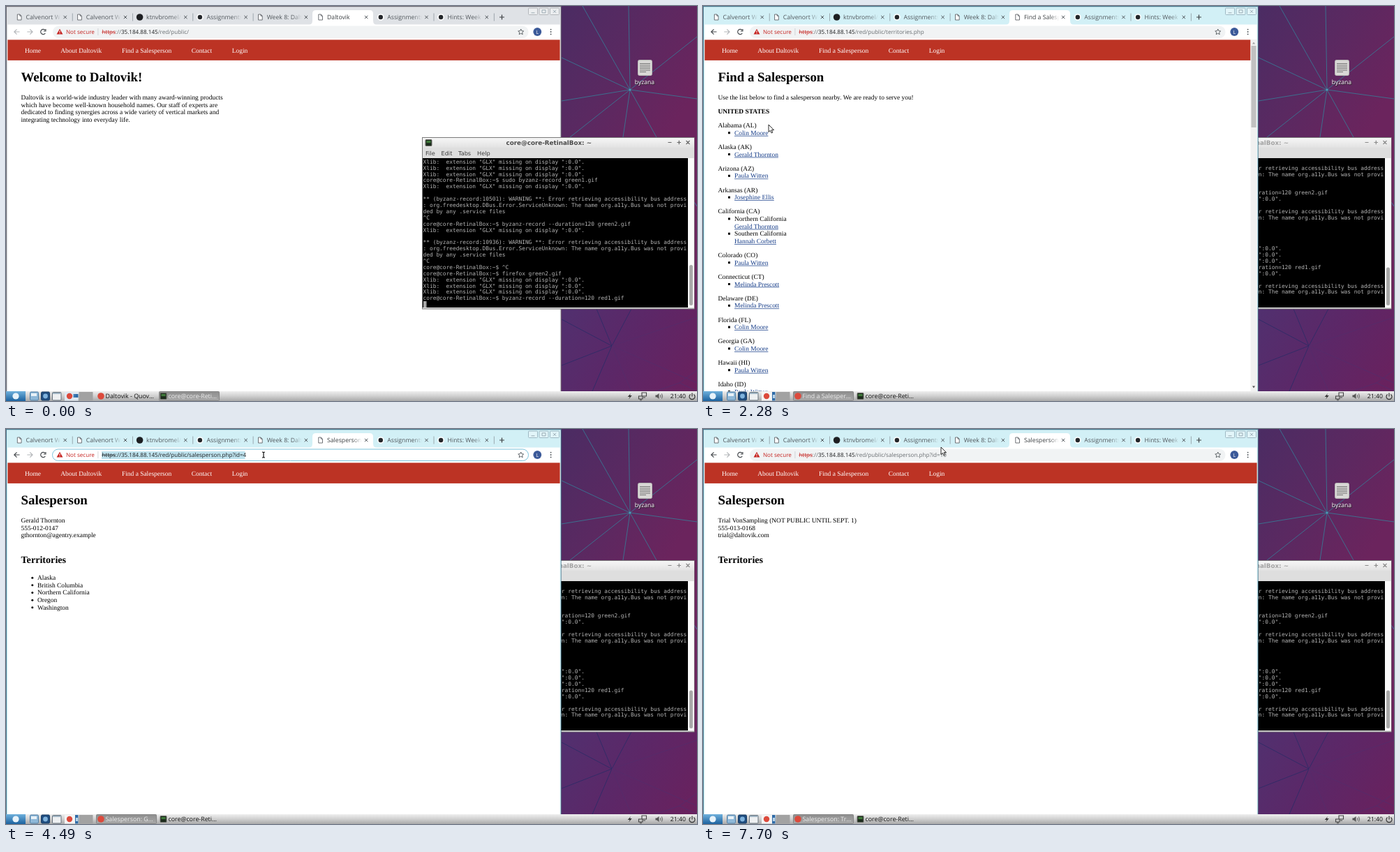
An HTML page with a canvas that plays this animation: 990x566 px, repeating every 8000 ms.

```html
<!DOCTYPE html>
<html lang="en">
<head>
<meta charset="utf-8">
<title>Desktop session</title>
<style>
  html, body { margin: 0; width: 100%; height: 100%; overflow: hidden; background: #4f2d63; }
  canvas { display: block; }
</style>
</head>
<body>
<canvas id="stage" width="990" height="566"></canvas>
<script>
const ctx = document.getElementById('stage').getContext('2d');
ctx.textRendering = 'geometricPrecision';

const LOOP = 8000, RAISE = 450;
const sans = (px, w = 400) => `${w} ${px}px "Open Sans", sans-serif`;
const serif = (px = 9.43, w = 400) => `${w} ${px}px "Liberation Serif", serif`;
const dejavu = (px, w = 400) => `${w} ${px}px "DejaVu Sans", sans-serif`;
const mono = '7.857px "DejaVu Sans Mono", monospace';

// ---- drawing helpers ----
function rect(x, y, w, h, color) { ctx.fillStyle = color; ctx.fillRect(x, y, w, h); }
function round(x, y, w, h, r, fill, stroke) {
  ctx.beginPath(); ctx.roundRect(x, y, w, h, r);
  if (fill) { ctx.fillStyle = fill; ctx.fill(); }
  if (stroke) { ctx.strokeStyle = stroke; ctx.lineWidth = 1; ctx.stroke(); }
}
function disc(x, y, r, color) {
  ctx.beginPath(); ctx.arc(x, y, r, 0, 7); ctx.fillStyle = color; ctx.fill();
}
function draw(d, x, y, stroke, width = 1, fill) {
  const p = new Path2D(d);
  ctx.save(); ctx.translate(x, y);
  if (fill) { ctx.fillStyle = fill; ctx.fill(p); }
  if (stroke) { ctx.strokeStyle = stroke; ctx.lineWidth = width; ctx.stroke(p); }
  ctx.restore();
}
function text(s, x, y, color, font, align = 'left') {
  ctx.font = font; ctx.fillStyle = color; ctx.textAlign = align;
  ctx.fillText(s, x, y);
  return x + ctx.measureText(s).width;
}
function shade(x0, y0, x1, y1, ...colors) {
  const g = ctx.createLinearGradient(x0, y0, x1, y1);
  colors.forEach((c, i) => g.addColorStop(i / (colors.length - 1), c));
  return g;
}
const clamp = v => Math.max(0, Math.min(1, v));

// ---- desktop ----
function rays(x, y, ends, color) {
  ctx.strokeStyle = color; ctx.lineWidth = 0.8;
  ctx.beginPath();
  for (const [a, b] of ends) { ctx.moveTo(x, y); ctx.lineTo(a, b); }
  ctx.stroke();
}
function desktop() {
  rect(0, 0, 990, 566, shade(796, 0, 990, 120, '#4b2c63', '#5a2961', '#6b245d'));
  rect(796, 434, 194, 120, shade(796, 434, 990, 552, '#51306f', '#5c2767', '#6a215d'));
  rays(894, 120, [[892, 0], [990, 44], [990, 133], [932, 188], [884, 188],
    [808, 188], [796, 136], [796, 74], [826, 0]], '#35809a');
  rays(868, 487, [[846, 434], [896, 434], [796, 449], [796, 515], [840, 552]], '#2a2b66');
  rays(868, 487, [[990, 446], [990, 540], [896, 552]], '#552c6b');
  rays(965, 540, [[990, 522], [990, 552], [930, 552]], '#552c6b');
  rays(990, 287, [[986, 281]], '#3a86b4');
  disc(894, 120, 1.5, '#4a9fb8');
  round(905.5, 77.5, 20, 22, 2, '#d9d8d6', '#b4b4b2');
  for (let i = 0; i < 6; i++) rect(908, 82 + i * 2.4, i == 5 ? 9 : 15, 1, '#777');
  text('byzana', 916, 113, '#222', sans(8.6), 'center');
  text('byzana', 915, 112, '#fff', sans(8.6), 'center');
}

// ---- terminal ----
const HOST = 'core@core-RetinalBox';
const prompt = cmd => `${HOST}:~$ ${cmd}`;
const xlib = 'Xlib:  extension "GLX" missing on display ":0.0".';
const warn = pid => ['',
  `** (byzanz-record:${pid}): WARNING **: Error retrieving accessibility bus address`,
  ': org.freedesktop.DBus.Error.ServiceUnknown: The name org.a11y.Bus was not provi',
  'ded by any .service files'];
const log = [xlib, xlib, xlib, prompt('sudo byzanz-record green1.gif'), xlib,
  ...warn(10501), '^C', prompt('byzanz-record --duration=120 green2.gif'), xlib,
  ...warn(10936), '^C', prompt('^C'), prompt('firefox green2.gif'), xlib, xlib, xlib,
  prompt('byzanz-record --duration=120 red1.gif'), xlib, ...warn(11275)];

function terminalIcon(x, y, s) {
  round(x, y, s, s, 1, '#1c2b1c', '#6d6d68');
  rect(x + 1.5, y + 1.5, s - 3, s * 0.35, '#3f7a3a');
}
function terminal(t, active) {
  rect(596, 188, 390.5, 246.5, '#7a7a7a');
  rect(597, 189, 389, 244.5, '#dedede');
  rect(597, 189, 389, 14, shade(0, 189, 0, 203, '#f6f6f6', '#e2e2e2'));
  terminalIcon(601, 191.5, 9);
  const ink = active ? '#4a4a4a' : '#a3a3a3';
  text(HOST + ': ~', 839, 199, ink, dejavu(8.76, 700), 'right');
  draw('M-2.5 0H2.5M10.5 0H16M13.3-2.7V2.7M23.5-2.5L28.5 2.5M28.5-2.5L23.5 2.5', 951, 195.5,
    active ? '#666' : '#8a8a8a', 1.2);
  [['File', 601], ['Edit', 623.5], ['Tabs', 648], ['Help', 675]]
    .forEach(([s, x]) => text(s, x, 213.5, '#3c3c3c', dejavu(8.2)));
  rect(597, 218, 380, 214, '#000');
  rect(977, 218, 8.5, 214, '#fafafa');
  const extra = t < 100 ? 0 : t < 260 ? 1 : 5;
  round(979, 371 + extra * 0.7, 5, 58 - extra * 0.7, 2.5, '#a9a9a9');
  for (let r = 0; r < 23; r++) text(log[r + extra], 597.5, 225.8 + r * 8.89, '#b4b4b4', mono);
  rect(598, 423, 4.5, 9, '#aaa');
}

// ---- web pages ----
const MAIL = 'gthornton@agentry.example', REP = 'Gerald Thornton';
const pages = [
  { title: 'Daltovik', task: 'Daltovik - Quov…', path: '/red/public/' },
  { title: 'Find a Salesperson', task: 'Find a Salesper…', path: '/red/public/territories.php' },
  { title: 'Salesperson: ' + REP, task: 'Salesperson: G…', path: '/red/public/salesperson.php?id=4' },
  { title: 'Salesperson: Trial', task: 'Salesperson: Tr…', path: '/red/public/salesperson.php?id=10' },
];
const territories = `Alabama (AL)|Colin Moore
Alaska (AK)|${REP}
Arizona (AZ)|Paula Witten
Arkansas (AR)|Josephine Ellis
California (CA)|Northern California/${REP}|Southern California/Hannah Corbett
Colorado (CO)|Paula Witten
Connecticut (CT)|Melinda Prescott
Delaware (DE)|Melinda Prescott
Florida (FL)|Colin Moore
Georgia (GA)|Colin Moore
Hawaii (HI)|Paula Witten
Idaho (ID)|Paula Witten`.split('\n').map(s => s.split('|'));
const LINE = 10.65;

function lines(list, y, x = 21.5) {
  list.forEach((s, i) => text(s, x, y + i * LINE, '#000', serif()));
}
function link(s, y) {
  const end = text(s, 45, y, '#153c88', serif());
  rect(45, y + 1, end - 45, 0.7, '#153c88');
}
function territoryList() {
  lines(['Use the list below to find a salesperson nearby. We are ready to serve you!'], 134);
  text('UNITED STATES', 21.5, 154, '#000', serif(9.43, 700));
  let y = 174.2;
  for (const [state, ...items] of territories) {
    lines([state], y);
    for (const item of items) {
      const parts = item.split('/');
      rect(36, y + LINE - 4.6, 3, 3, '#000');
      if (parts[1]) lines([parts[0]], y += LINE, 45);
      link(parts.at(-1), y += LINE);
    }
    y += 20.15;
  }
}
function webPage(n) {
  const right = n == 1 ? 784.5 : 793.6;
  rect(2.4, 48, 791.2, 518, '#fff');
  rect(2.4, 48.4, right - 2.4, 29.5, '#bc3324');
  [['Home', 27], ['About Daltovik', 78.3], ['Find a Salesperson', 166], ['Contact', 265.8], ['Login', 323.7]]
    .forEach(([s, x]) => text(s, x, 66.9, '#fff', serif()));
  const head = ['Welcome to Daltovik!', 'Find a Salesperson', 'Salesperson', 'Salesperson'][n];
  text(head, 21.5, 107.7, '#000', serif(18.85, 700));
  if (n == 0) {
    lines(['Daltovik is a world-wide industry leader with many award-winning products',
      'which have become well-known household names. Our staff of experts are',
      'dedicated to finding synergies across a wide variety of vertical markets and',
      'integrating technology into everyday life.'], 134);
  } else if (n == 1) {
    territoryList();
    rect(784.5, 48, 9.1, 504, '#f1f1f1');
    rect(785.5, 57, 7, 117, '#c1c1c1');
    draw('M-2 1.5L0-1.5L2 1.5Z', 789, 53, null, 0, '#a3a3a3');
    draw('M-2-1.5L0 1.5L2-1.5Z', 789, 546, null, 0, '#505050');
  } else {
    lines(n == 2 ? [REP, '555-012-0147', MAIL]
      : ['Trial VonSampling (NOT PUBLIC UNTIL SEPT. 1)', '555-013-0168', 'trial@daltovik.com'], 134);
    text('Territories', 21.5, 192.4, '#000', serif(14.13, 700));
    if (n == 2) {
      const list = ['Alaska', 'British Columbia', 'Northern California', 'Oregon', 'Washington'];
      lines(list, 216.1, 45);
      list.forEach((_, i) => disc(37.8, 213.2 + i * LINE, 1.5, '#000'));
    }
  }
}

// ---- browser ----
const IP = '35.184.88.145', UI = sans(8.1), GREY = '#686d71', DARK = '#1c1e20', RED = '#c5221f';

function docIcon(x, y) {
  draw('M-2.7-4H.8L3-1.8V4H-2.7ZM.8-4V-1.8H3', x, y, '#5f6368', 0.9, '#fff');
}
function spinner(x, y, t) {
  ctx.beginPath(); ctx.arc(x, y, 3.8, t / 120, t / 120 + 1.2);
  ctx.strokeStyle = '#8a8f94'; ctx.lineWidth = 1.1; ctx.stroke();
}
function address(path, x, proto, tone, struck) {
  const a = text('https', x, 40, proto, UI);
  if (struck) rect(x, 37.2, a - x, 0.6, proto);
  const b = text('://', a, 40, tone, UI);
  return text(path, text(IP, b, 40, DARK, UI), 40, tone, UI);
}
function tabs(s, t) {
  const names = ['Calvenort Word', 'Calvenort Word', 'ktnvbromel/week', 'Assignments', 'Week 8: Daltovik', s.title,
    'Assignments', 'Hints: Week 8'];
  draw('M433 27Q439 27 439 21V11Q439 6 444 6H521Q526 6 526 11V21Q526 27 532 27Z', 0, 0, null, 0, '#fff');
  names.forEach((name, i) => {
    const x = 19 + 86.3 * i, on = i == 5;
    if (on && s.loading) spinner(x, 16, t);
    else if (i == 2) disc(x, 16, 4.8, '#1d1f22');
    else if (i == 3 || i > 5) { disc(x, 16, 4.8, '#fff'); disc(x, 16, 3.2, '#23262a'); }
    else docIcon(x, 16);
    const tx = x + 9.5, ink = on ? '#3c4043' : '#50565b';
    ctx.save();
    ctx.beginPath(); ctx.rect(tx, 6, 50, 20); ctx.clip();
    text(name, tx, 19, shade(tx + 37, 0, tx + 50, 0, ink, ink + '00'), sans(8.7));
    ctx.restore();
    draw('M-2.2-2.2L2.2 2.2M2.2-2.2L-2.2 2.2', x + 65.7, 16, '#50565b', 1);
    if (i != 4 && !on) rect(x + 75.8, 10.5, 0.8, 11, '#8e989f');
  });
  draw('M-3.5 0H3.5M0-3.5V3.5', 710.5, 16, '#3c4043', 1.2);
}
function toolbar(s, t) {
  const arrow = 'M4 0H-3.6M0-3.7L-3.7 0L0 3.7';
  draw(arrow, 15.5, 37, s.page ? '#45494d' : '#b4b7ba', 1.2);
  draw('M-4 0H3.6M0-3.7L3.7 0L0 3.7', 34.3, 37, '#b4b7ba', 1.2);
  if (s.loading) draw('M-3-3L3 3M3-3L-3 3', 53.3, 37, '#45494d', 1.2);
  else draw('M3 2A3.6 3.6 0 1 1 2.6-2.5M3.6-4V-1H.6', 53.3, 37, '#45494d', 1.2);

  round(67, 28.5, 681.5, 17.5, 8.7, '#f1f3f4');
  if (s.focus) {
    ctx.globalAlpha = clamp((t - 4320) / 150);
    round(66.5, 29, 682, 16.5, 8.2, '#fff', '#7cc4dd');
    ctx.globalAlpha = 1;
  }
  draw('M0-4L4.4 3.7H-4.4Z', 77, 36.8, null, 0, RED);
  rect(76.5, 35.2, 1, 2.8, '#fff'); rect(76.5, 38.7, 1, 1, '#fff');
  text('Not secure', 86, 40, RED, UI);
  rect(131.5, 32, 0.8, 10, '#c9ccd0');
  if (s.focus && t < 5010) rect(137, 32, 205.5, 11, '#bfe3ee');
  const end = s.focus ? address(s.path, 137.3, DARK, DARK, true) : address(s.path, 137.3, RED, GREY, true);
  if (s.focus && t >= 5010) rect(end, 32, 0.8, 10.5, '#000');
  draw('M0-4L1.2-1.3L4-1L1.9.9L2.5 3.7L0 2.3L-2.5 3.7L-1.9.9L-4-1L-1.2-1.3Z', 737.7, 37, '#50565b', 0.9);
  disc(761.3, 37, 5.9, '#3c5a99');
  text('L', 761.3, 39.6, '#fff', sans(7), 'center');
  [33.6, 37, 40.4].forEach(y => disc(780.6, y, 0.95, '#50565b'));
}
function globe(y) {
  disc(77, y, 4, '#5f6368');
  draw('M-3-1L-1-2.5L0-.5L-2 1ZM1 0L3-1V1.5L1 2.5Z', 77, y, null, 0, '#fff');
}
function popup(t) {
  const typed = 'id=' + (t < 5590 ? '' : t < 5780 ? '1' : '10');
  const path = '/red/public/salesperson.php?' + typed, full = 'https://' + IP + path;
  const three = t < 5590;
  ctx.save();
  ctx.shadowColor = 'rgba(0,0,0,.35)'; ctx.shadowBlur = 8; ctx.shadowOffsetY = 2;
  round(63, 26, 689, three ? 86 : 65, 4, '#fff');
  ctx.restore();
  rect(63, 48, 689, 21.3, '#f1f1f1');
  globe(37); globe(58.5);
  const end = address(path, 93, GREY, GREY, false);
  if (t < 6250 || t >= 6760) rect(end, 32, 0.8, 10.5, '#000');
  text(full, 93, 61.5, '#0f559f', sans(8.1, 600));
  let y = 83;
  if (three) {
    globe(80);
    text(full + '4', 93, y, '#0f559f', UI);
    y += 21.3;
  }
  draw('M1.5 1.5L3.8 3.8M2.2-.5A2.5 2.5 0 1 1-2.8-.5A2.5 2.5 0 1 1 2.2-.5', 77, y - 3, '#5f6368', 1);
  text(' - Quovel Search', text(full, 93, y, '#000', UI), y, '#55595d', UI);
}
function statusBubble(t) {
  let alpha = 0, id = 4;
  if (t > 1150 && t < 1450) alpha = clamp((t - 1150) / 120);
  if (t > 2360 && t < 3370) { alpha = Math.min(clamp((t - 2360) / 120), clamp((3370 - t) / 160)); id = t < 2440 ? 1 : 4; }
  if (!alpha) return;
  ctx.globalAlpha = alpha;
  round(2, 546, 264, 20, [0, 3, 0, 0], '#f6f7f8', '#e4e6e8');
  const path = t < 2000 ? 'territories.php' : 'salesperson.php?id=' + id;
  text(`https://${IP}/red/public/${path}`, 5, 555.5, '#5f6368', sans(8.7));
  ctx.globalAlpha = 1;
}
function browser(s, t, active) {
  rect(0, 0, 795.6, 566, active ? '#47758c' : '#6b6b73');
  rect(1, 1.2, 793.8, 565, active ? '#d2f0f6' : '#dfe2e6');
  tabs(s, t);
  [750, 765.5, 781].forEach((x, i) => {
    round(x - 1.5, 3, 13, 9.5, 1, active ? '#e2f5f9' : '#eceef0', active ? '#9fb9c4' : '#b5b8bc');
    draw(['M-2.5 2H2.5', 'M-2.5-2H2.5V2H-2.5Z', 'M-2-2L2 2M2-2L-2 2'][i], x + 5, 7.8, '#93a4ae', 0.9);
  });
  rect(2.4, 26.5, 791.2, 21.5, '#fff');
  toolbar(s, t);
  webPage(s.page);
  statusBubble(t);
  if (s.focus && t >= 5360) popup(t);
}

// ---- task bar ----
function taskButton(x, label, on) {
  if (on) round(x + 0.5, 552.5, 86, 13, 1, shade(0, 552, 0, 566, '#8d8d8d', '#aaaaaa'), '#858585');
  text(label, x + 13.5, 562.3, on ? '#ececec' : '#111', sans(8.85));
}
function taskBar(s, active) {
  rect(0, 552, 990, 14, shade(0, 552, 0, 566, '#efefef', '#cfcfcf', '#a9a9a9'));
  rect(0, 552, 28, 14, shade(0, 552, 0, 566, '#6fb0dc', '#1c629f'));
  disc(14, 559, 4.6, '#e8f3fa');
  round(34.5, 553, 12, 12, 1.5, '#8fb8d8', '#4f7da3');
  rect(36, 555, 8, 4, '#e8f1f7');
  round(50.5, 553, 12, 12, 1.5, '#1f4d80', '#173a60');
  disc(56.5, 559, 3.4, '#7fb2dc');
  round(66.5, 553.5, 12.5, 11.5, 1, '#eef0f2', '#66727c');
  rect(67, 554, 11.5, 2, '#9fb3c2');
  rect(84, 553, 19.5, 12.5, active ? '#f4f4f4' : '#dfe9f2');
  rect(104.5, 553, 20, 12.5, '#a2a2a2');
  rect(99, active ? 553 : 556, 4.5, active ? 12.5 : 5, '#2f6ca8');
  if (active) rect(100, 557, 3, 5, '#b9d3e8');
  else rect(96.5, 556, 3, 5, '#3f7cb6');
  disc(91, 559, 4.2, '#dc4a3c');
  taskButton(129, pages[s.page].task, active);
  taskButton(219, HOST.slice(0, 14) + '…', !active);
  disc(136, 559, 4.8, '#dc4a3c');
  terminalIcon(221, 554.5, 9);
  draw('M1.5-4L-3 1H0L-1.5 4.5L3-1H0Z', 893.7, 559, null, 0, '#333');
  draw('M-1-5H5.5V0H-1ZM-5.5 0H0V4H-5.5ZM-4 5.5H-1M1 2H4', 912, 559, '#444', 1.1);
  draw('M-5-1.5H-3L0-4V4L-3 1.5H-5Z', 935.5, 559, null, 0, '#555');
  draw('M2-2Q3.2 0 2 2M4-3.5Q6 0 4 3.5', 935.5, 559, '#555', 0.9);
  text('21:40', 951.8, 562.3, '#111', sans(8.7));
  draw('M2.4-3A4 4 0 1 1-2.4-3M0-5V0', 983, 559.5, '#333', 1.2);
}

// ---- pointer ----
const route = [[50, 640, 300], [900, 226, 64], [1050, 224, 60], [1350, 224, 60], [1680, 185, 76],
  [2280, 94, 170], [2500, 94, 214], [3550, 94, 214], [4250, 369, 37], [7620, 369, 37], [7700, 341, 26]];
const BEAM = 'M-2-4Q0-4 0-3Q0-4 2-4M0-3V3M-2 4Q0 4 0 3Q0 4 2 4';

function pointer(t) {
  if (t < 50) return;
  let i = route.findIndex(k => k[0] > t);
  if (i < 0) i = route.length;
  const a = route[i - 1], b = route[i] || a;
  const u = b == a ? 0 : (t - a[0]) / (b[0] - a[0]), e = u * u * (3 - 2 * u);
  const x = a[1] + (b[1] - a[1]) * e, y = a[2] + (b[2] - a[2]) * e;
  if (t > 4170 && t < 7640) {
    draw(BEAM, x, y, '#fff', 2.4);
    draw(BEAM, x, y, '#111', 1.2);
  } else if ((t > 860 && t < 1500) || (t > 2360 && t < 3590)) {
    draw('M-1 1Q0-.6 1 1V3.5L5 4.4Q6 4.8 5.8 6L5 9.4H.4L-2.4 6.2Q-2.4 4.8-1 5.8Z', x, y, '#111', 0.9, '#fff');
  } else {
    draw('M0 0V10.6L2.4 8.3L4.1 12L5.8 11.2L4.2 7.7H7.5Z', x, y, '#111', 0.9, '#fff');
  }
}

function state(t) {
  const page = t < 1450 ? 0 : t < 2700 ? 1 : t < 7340 ? 2 : 3;
  const loading = (t >= 1320 && t < 1640) || (t >= 2580 && t < 3030) || (t >= 7260 && t < 7490);
  const fresh = (t >= 1450 && t < 1640) || (t >= 2700 && t < 3030) || (t >= 7340 && t < 7490);
  return {
    page, loading,
    title: fresh ? 'https://' + IP : pages[page].title,
    path: pages[t >= 7260 ? 3 : page].path,
    focus: t >= 4320 && t < 7260,
  };
}
function frame() {
  const t = performance.now() % LOOP, s = state(t), active = t >= RAISE;
  desktop();
  if (active) { terminal(t, false); browser(s, t, true); }
  else { browser(s, t, false); terminal(t, true); }
  taskBar(s, active);
  pointer(t);
  requestAnimationFrame(frame);
}
frame();
</script>
</body>
</html>
```
